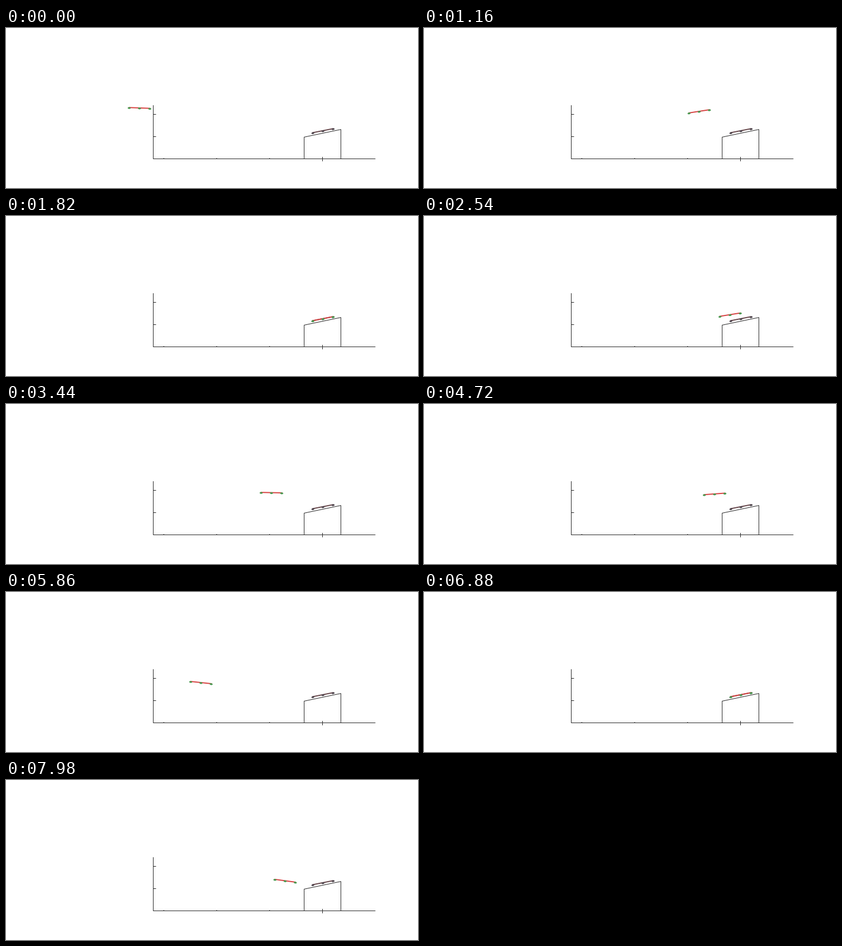
These frames come from a looping animation (740 px wide and 288 px high, 8 s). A matplotlib script:

```python
import math

import matplotlib.pyplot as plt
from matplotlib.animation import FuncAnimation
from matplotlib.patches import Ellipse
from matplotlib.transforms import Affine2D

W, H, DPI = 740, 288, 100
STEP, LOOP = 20, 8000
PX = 72 / DPI
INK = "#262626"

GOAL = (569.3, 185.3)
ACCEL = 4.3e-4  # pixels per ms squared, speeding up and braking alike

# Each flight begins at a time and place and climbs by some lift on its way
FLIGHTS = [
    dict(start=0, x=239.8, y=144.4, lift=30),
    dict(start=1917, x=477.5, y=173, lift=5.4),
    dict(start=2755, x=376, y=162, lift=14),
    dict(start=4080, x=437, y=145.5, lift=8),
    dict(start=5094, x=224, y=181, lift=20),
    dict(start=6900, x=505.5, y=163, lift=0),
    dict(start=7640, x=476.5, y=181, lift=0.5),
]


def glide(s):
    """Constant acceleration to halfway, then constant braking."""
    return 2 * s * s if s < 0.5 else 1 - 2 * (1 - s) ** 2


def pose(ms):
    flight = [f for f in FLIGHTS if f["start"] <= ms][-1]
    x0, y0 = flight["x"], flight["y"]
    dist, drop = GOAL[0] - x0, GOAL[1] - y0
    span = 2 * math.sqrt(dist / ACCEL)
    s = min((ms - flight["start"]) / span, 1)
    climb = flight["lift"] * (4 * s * (1 - s)) ** 2
    x = x0 + dist * glide(s)
    y = y0 + drop * s * s * (3 - 2 * s) - climb
    # Nose down while speeding up, nose up while braking
    tilt = -1.2 - 10 * math.tanh((s - 0.54) / 0.12)
    return x, y, tilt * min(1, 0.25 + 6 * s)


fig = plt.figure(figsize=(W / DPI, H / DPI), dpi=DPI, facecolor="white")
ax = fig.add_axes([0, 0, 1, 1])
ax.set_xlim(0, W)
ax.set_ylim(H, 0)
ax.axis("off")


def line(*pts):
    ax.plot(*zip(*pts), color=INK, lw=PX, snap=False,
            solid_capstyle="butt", solid_joinstyle="miter")


class Craft:
    def __init__(self, body, rotor, z):
        self.parts = ax.plot([-19.5, 19.5], [-0.5, -0.5], color=body,
                             lw=2 * PX, solid_capstyle="butt", zorder=z)
        for x in (-18.5, 0, 18.5):
            blob = Ellipse((x, 0.4), 5.4, 3.2, fc=rotor, ec="none",
                           zorder=z + 1)
            self.parts.append(ax.add_patch(blob))

    def place(self, x, y, tilt):
        move = Affine2D().rotate_deg(tilt).translate(x, y)
        for part in self.parts:
            part.set_transform(move + ax.transData)


line((264.5, 139), (264.5, 235.5), (663.5, 235.5))
for y in (155.5, 195.5):
    line((265, y), (269.5, y))
for k in range(3):
    x = 283.5 + 95 * k
    line((x, 234), (x, 235))
line((568.5, 232), (568.5, 240))
line((535.5, 235), (535.5, 196.4), (601.5, 182.6), (601.5, 235))

goal = Craft("#6a4a4e", "#4f464e", 3)
goal.place(*GOAL, -11.2)
craft = Craft("#d84444", "#489a50", 5)


def update(i):
    craft.place(*pose(i * STEP))
    return craft.parts


anim = FuncAnimation(fig, update, frames=LOOP // STEP, interval=STEP,
                     init_func=lambda: update(0), repeat=True,
                     repeat_delay=0, blit=False)
plt.show()
```
